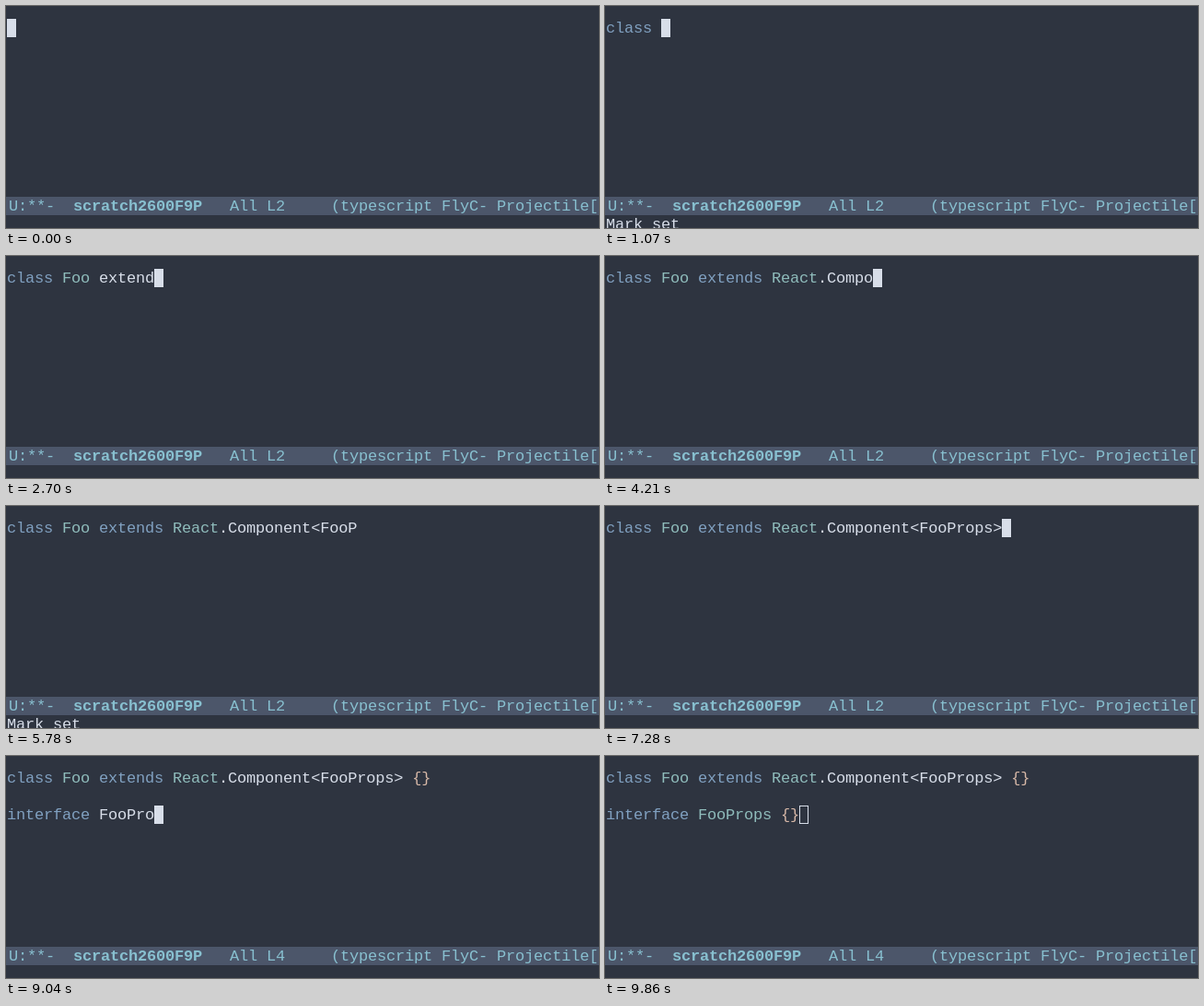
Write an HTML page that moves like this. It is 644x242 px and loops after 9.94 s.

```html
<!DOCTYPE html>
<html lang="en">
<head>
<meta charset="utf-8">
<title>Typing a class in an editor</title>
<style>
  html, body { margin: 0; width: 100%; height: 100%; overflow: hidden; background: #2e3440; }
  #stage {
    position: relative; width: 644px; height: 242px; overflow: hidden;
    background: #2e3440; color: #d8dee9;
    font: 17px/20px "Liberation Mono", "Courier New", monospace;
    letter-spacing: -.2px; white-space: pre;
  }
  #stage > div { position: absolute; left: 1px; }
  #text { top: 15px; }
  #cursor { width: 10px; height: 20px; box-sizing: border-box; background: #d8dee9; }
  #cursor.hollow { background: none; border: 1px solid #d8dee9; }
  #stage > #mode {
    left: 0; top: 208px; width: 641px; height: 20px; padding-left: 3px;
    line-height: 22px; background: #4c566a; color: #88c0d0;
  }
  #echo { top: 229px; }
  .keyword { color: #81a1c1; }
  .type { color: #8fbcbb; }
  .brace { color: #d8b9a8; }
</style>
</head>
<body>
<div id="stage">
  <div id="text"></div>
  <div id="cursor"></div>
  <div id="mode">U:**-  <b>scratch2600F9P</b>   All L<span id="line">2</span>     (typescript FlyC- Projectile[</div>
  <div id="echo">Mark set</div>
</div>
<script>
const LOOP = 9940;
const FOCUS_LOST = 9860;

// Each burst types its text evenly; "message" is how long the echo area speaks.
const bursts = [
  { start: 150, end: 920, text: "class" },
  { start: 1070, end: 1070, text: " ", message: 460 },
  { start: 1530, end: 1780, text: "Foo" },
  { start: 2100, end: 2700, text: " extend" },
  { start: 2870, end: 3020, text: "s " },
  { start: 3720, end: 4210, text: "React.Compo", message: 80 },
  { start: 4360, end: 4530, text: "nent<" },
  { start: 5080, end: 5320, text: "Foo" },
  { start: 5780, end: 6480, text: "Props", message: 80 },
  { start: 6960, end: 6960, text: ">" },
  { start: 7740, end: 8360, text: " {}\n\nint" },
  { start: 8420, end: 8590, text: "erface" },
  { start: 8820, end: 9100, text: " FooProps", message: 80 },
  { start: 9580, end: 9760, text: " {}", message: 80 }
];

function typed({ start, end, text }, time) {
  if (time < start) return "";
  if (time >= end) return text;
  const progress = (time - start) / (end - start);
  return text.slice(0, 1 + Math.floor((text.length - 1) * progress));
}

const syntax = /(?<keyword>\b(?:class|extends|interface)\b)|(?<type>(?<=(?:class|interface) )\w+(?= )|(?<=extends )\w+)|(?<brace>[{}])/g;

function highlight(text) {
  return text.replace(/</g, "&lt;").replace(syntax, (token, ...rest) => {
    const groups = rest.at(-1);
    const kind = Object.keys(groups).find(name => groups[name]);
    return `<span class="${kind}">${token}</span>`;
  });
}

const [textBox, cursor, lineNumber, echo] =
  ["text", "cursor", "line", "echo"].map(id => document.getElementById(id));

function draw(time) {
  const text = bursts.map(burst => typed(burst, time)).join("");
  const lines = text.split("\n");
  const row = lines.length - 1;
  const message = bursts.some(b => time >= b.start && time < b.start + (b.message || 0));

  textBox.innerHTML = highlight(text);
  lineNumber.textContent = row + 2;
  echo.hidden = !message;
  // The cursor is redrawn late when a letter arrives along with a message.
  cursor.hidden = message && /\w$/.test(text);
  cursor.className = time >= FOCUS_LOST ? "hollow" : "";
  cursor.style.left = 1 + lines[row].length * 10 + "px";
  cursor.style.top = 14 + row * 20 + "px";
}

const start = performance.now();
function tick() {
  draw((performance.now() - start) % LOOP);
  requestAnimationFrame(tick);
}
tick();
</script>
</body>
</html>
```
